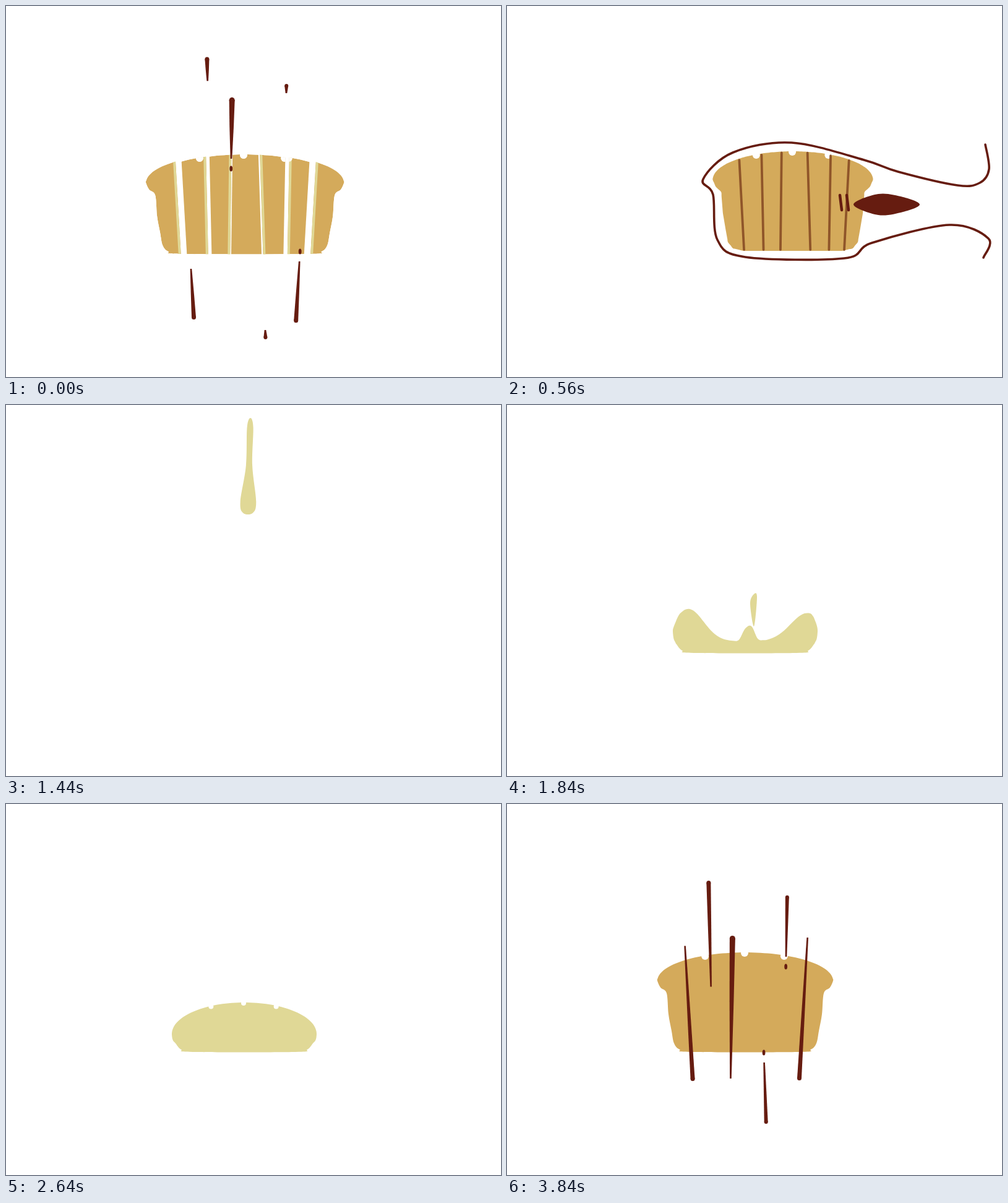
An HTML page with a canvas that plays this animation: 800 px wide and 600 px high, repeating every 3920 ms.

```html
<!DOCTYPE html>
<html lang="en">
<head>
<meta charset="utf-8">
<title>Loaf</title>
<style>
html, body { margin: 0; width: 100%; height: 100%; overflow: hidden; background: #fff; }
canvas { display: block; width: 800px; height: 600px; }
</style>
</head>
<body>
<canvas id="c" width="800" height="600"></canvas>
<script>
const ctx = document.getElementById('c').getContext('2d');
const STEP = 80, LOOP = 3920;
const DARK = '#661c10', CRUST = '#d4aa5b', CREAM = '#e0d896', LINE = '#8f5529', PAPER = '#fff';
const CX = 385, BASE = 401;

const mix = (a, b, k) => a + (b - a) * k;
const clamp = v => Math.max(0, Math.min(1, v));
const smooth = v => { v = clamp(v); return v * v * (3 - 2 * v); };
const bell = (v, w) => Math.exp(-((v / w) ** 2) / 2);
const morph = (a, b, k) => a.map((p, i) => [mix(p[0], b[i][0], k), mix(p[1], b[i][1], k)]);
const move = (pts, dx) => pts.map(([x, y]) => [x + dx, y]);

// Catmull-Rom curve through the points.
function curve(p, closed) {
  const n = p.length;
  const q = i => closed ? p[(i + n) % n] : p[Math.max(0, Math.min(n - 1, i))];
  ctx.beginPath();
  ctx.moveTo(...p[0]);
  for (let i = 0; i < (closed ? n : n - 1); i++) {
    const [a, b, c, d] = [q(i - 1), q(i), q(i + 1), q(i + 2)];
    ctx.bezierCurveTo(b[0] + (c[0] - a[0]) / 6, b[1] + (c[1] - a[1]) / 6,
      c[0] - (d[0] - b[0]) / 6, c[1] - (d[1] - b[1]) / 6, c[0], c[1]);
  }
}
function blob(pts, color) {
  curve(pts, true);
  ctx.fillStyle = color;
  ctx.fill();
}
function line(pts, color, width) {
  curve(pts, false);
  ctx.strokeStyle = color;
  ctx.lineWidth = width;
  ctx.stroke();
}
function oval(x, y, rx, ry, color) {
  ctx.beginPath();
  ctx.ellipse(x, y, rx, ry, 0, 0, 7);
  ctx.fillStyle = color;
  ctx.fill();
}

// time, top, cap half width, cap y, neck half width, neck y, foot half width, bite radius
const growth = [
  [1840, 345, 117, 365, 116, 376, 111, 0],
  [2240, 345, 117, 382, 116, 386, 111, 0],
  [2400, 345, 117, 382, 116, 386, 111, 0],
  [2640, 321, 117, 372, 116, 380, 111, 4],
  [2960, 244, 130, 297, 126, 318, 112, 6],
  [3120, 227, 136, 281, 128, 302, 113, 7],
  [3440, 240, 142, 286, 127, 306, 115, 6],
  [3920, 240, 142, 286, 127, 306, 115, 6]
];
function stage(t) {
  let i = 0;
  while (i < growth.length - 2 && t >= growth[i + 1][0]) i++;
  const a = growth[i], b = growth[i + 1], k = (t - a[0]) / (b[0] - a[0]);
  const [top, cap, capY, neck, neckY, foot, bite] = a.slice(1).map((v, j) => mix(v, b[j + 1], k));
  return { top, cap, capY, neck, neckY, foot, bite, splash: clamp((2240 - t) / 400) ** 1.5 };
}

// Elliptic top, or a splash crown, over a tin-shaped body.
function outline(s) {
  const top = [], n = 36;
  for (let i = 0; i <= n; i++) {
    const u = Math.sin((i / n - .5) * Math.PI), round = Math.sqrt(1 - u * u);
    const dome = s.capY - (s.capY - s.top) * round;
    const rim = (49 - 4 * u) * bell(Math.abs(u) - .82 - .05 * u, .22) + 29 * bell(u - .05, .06);
    const crown = 382 - mix(17, rim, Math.min(1, round * 2.6));
    top.push([CX + u * s.cap, mix(dome, crown, s.splash)]);
  }
  const footY = BASE - 14;
  const side = [
    [mix(s.cap, s.neck, .35), mix(s.capY, s.neckY, .55)],
    [s.neck, s.neckY],
    [mix(s.neck, s.foot, .25), mix(s.neckY, footY, .42)],
    [mix(s.neck, s.foot, .65), mix(s.neckY, footY, .74)],
    [s.foot, footY], [s.foot - 9, BASE - 4], [s.foot - 28, BASE]
  ];
  return [...top, ...side.map(([x, y]) => [CX + x, y]), ...side.map(([x, y]) => [CX - x, y]).reverse()];
}
const bites = s => [-.45, 0, .45].map(u =>
  [CX - 1 + u * s.cap, s.capY - (s.capY - s.top) * Math.sqrt(1 - u * u) + 1]);

function drawLoaf(s, color) {
  blob(outline(s), color);
  for (const [x, y] of bites(s)) oval(x, y, s.bite, s.bite, PAPER);
}

function drawPour(t) {
  const p = (t - 1280) / 480, x = 391;
  const top = 9 + 107 * p * p, end = 60 + 344 * p, w = 10 + 25 * p * p, h = end - top;
  const half = [[.1, 5], [.5, w * .4], [.88, w], [1, w * .6]];
  const side = d => half.map(([k, r]) => [x + 4 * (1 - k) + d * r, top + h * k]);
  blob([[x + 4, top], ...side(1), ...side(-1).reverse()], CREAM);
}

function drawDough(t) {
  const k = clamp((t - 2720) / 400);
  drawLoaf(stage(t), `rgb(${mix(224, 212, k)},${mix(216, 170, k)},${mix(150, 91, k)})`);
  if (t < 1920) blob([[400, 305], [404, 312], [399, 358], [393, 320]], CREAM);
}

// Cuts: x at the top and bottom of the loaf, stroke direction, end y, width, start time.
const cuts = [
  [288.5, 297.5, 1, 525, 7, 3670],
  [328.5, 332, -1, 75, 7, 3640],
  [364, 362, -1, 125, 9, 3680],
  [410, 415, 1, 540, 6, 3600],
  [451, 448, -1, 125, 6, 3600],
  [484, 475, 1, 535, 7, 3680]
];
const cutX = (i, y) => mix(cuts[i][0], cuts[i][1], (y - 245) / 155);

// The head of each streak slows to its end and the tail catches up.
function drawStreaks(t) {
  cuts.forEach(([, , dir, end, w, start], i) => {
    const n = (t - start) / STEP;
    if (n < 0 || n > 4.4) return;
    const head = end - dir * 400 * (1 - n / 4.4) ** 2.5;
    const tail = end - dir * (16 + 409 * (1 - smooth((n - 1) / 3)));
    const r = w / 2, h = head - dir * r;
    const half = [[tail, 1.3], [mix(tail, h, .55), r * .75], [h, r]];
    ctx.beginPath();
    for (const [y, d] of half) ctx.lineTo(cutX(i, y) + d, y);
    for (const [y, d] of half.reverse()) ctx.lineTo(cutX(i, y) - d, y);
    ctx.fillStyle = DARK;
    ctx.fill();
    oval(cutX(i, h), h, r, r, DARK);
    if (n === 3) oval(cutX(i, tail - 16 * dir), tail - 16 * dir, 2.4, 4.5, DARK);
  });
}

function drawSlices(spread) {
  const loaf = stage(3440), face = i => i < 3 ? 2 : -2;
  for (let i = 0; i <= cuts.length; i++) {
    const d = i - 2.9;
    const left = y => i ? cutX(i - 1, y) - face(i - 1) * (i > 3 ? -1 : -1) : 0;
    const right = y => i < cuts.length ? cutX(i, y) + face(i) : 800;
    ctx.save();
    ctx.translate(mix(-4.4 * d, 2 * d * Math.abs(d), spread), -5 * (1 - spread));
    ctx.beginPath();
    ctx.moveTo(i > 3 ? cutX(i - 1, 200) - 2 : i ? cutX(i - 1, 200) + 2 : 0, 200);
    ctx.lineTo(right(200), 200);
    ctx.lineTo(right(420), 420);
    ctx.lineTo(i > 3 ? cutX(i - 1, 420) - 2 : i ? cutX(i - 1, 420) + 2 : 0, 420);
    ctx.clip();
    curve(outline(loaf), true);
    ctx.clip();
    drawLoaf(loaf, CRUST);
    const shown = i < 3 ? i : i - 1;
    if (i !== 3) line([[cutX(shown, 200), 200], [cutX(shown, 420), 420]], CREAM, 4);
    for (const [x, y] of bites(loaf)) oval(x, y, loaf.bite, loaf.bite, PAPER);
    ctx.restore();
  }
}

function divide(p, closed) {
  const out = [];
  for (let i = 0; i < p.length - (closed ? 0 : 1); i++) {
    const a = p[i], b = p[(i + 1) % p.length], n = Math.ceil(Math.hypot(b[0] - a[0], b[1] - a[1]) / 7);
    for (let j = 0; j < n; j++) out.push([mix(a[0], b[0], j / n), mix(a[1], b[1], j / n)]);
  }
  return closed ? out : [...out, p[p.length - 1]];
}
// Packs the slices, then lets the tied neck of the bag dent the end.
function pack([x, y], m) {
  x += 77 - (x - CX) * .088;
  y -= 5;
  const edge = clamp((x - 551) / 8);
  const bow = 24 * smooth((x - 485) / 30) * clamp(1 - ((y - 322) / 76) ** 2);
  const pinch = 30 * bell(y - 324, 20);
  const push = 46 * edge * smooth((y - 345) / 35);
  return [x + m * (push - mix(bow, pinch, edge)), y];
}
function drawPacked(off, m) {
  const loaf = stage(3440), place = p => move(p.map(q => pack(q, m)), off);
  blob(place(divide(outline(loaf), true)), CRUST);
  for (const [x, y] of place(bites(loaf))) oval(x, y, 6, 6, PAPER);
  cuts.forEach((_, i) => {
    const u = (cutX(i, 250) - CX) / loaf.cap;
    const top = loaf.capY - (loaf.capY - loaf.top) * Math.sqrt(1 - u * u) + 2;
    line(place(divide([[cutX(i, top) + 1, top], [cutX(i, 399) + 1, 399]])), LINE, 3.8);
  });
}

// Bag and its print, open and tied; the tied set is drawn 226 further left.
const bagOpen = [[773,224],[779,264],[764,286],[728,290],[632,268],[577,249],[460,221],[365,237],[317,280],
  [333,305],[340,378],[385,406],[545,408],[590,383],[715,354],[778,376],[770,407]];
const bagTied = move([[487,332],[485,314],[478,315],[399,331],[350,316],[375,282],[300,236],[140,236],[98,280],
  [111,305],[127,380],[155,405],[372,406],[398,390],[344,342],[440,333],[487,332]], 226);
const printOpen = [[560,321],[600,304],[640,309],[667,321],[640,333],[600,338]];
const printTied = move([[232,326],[268,300],[313,308],[298,321],[303,335],[268,345]], 226);

function drawBag(off, m) {
  line(move(morph(bagOpen, bagTied, m), off), DARK, 3.6);
  const print = move(morph(printOpen, printTied, m), off);
  blob(print, DARK);
  const [x, y] = print[0];
  for (const gap of [8, 19]) line([[x - gap - 3, y - 15], [x - gap, y + 9]], DARK, mix(4.5, 6, m));
  oval(592 + off, 331, 33 * m, 13 * m, DARK);
}

function drawBagged(t) {
  const enter = clamp((t - 160) / 400), leave = clamp((t - 560) / 400);
  const off = -620 * (1 - enter) ** 1.7 - 430 * leave ** 2.9, tie = smooth(leave / .6);
  drawPacked(leave ? off : Math.max(-77, off), tie);
  drawBag(off, tie);
}

function draw(t) {
  ctx.fillStyle = PAPER;
  ctx.fillRect(0, 0, 800, 600);
  ctx.lineCap = ctx.lineJoin = 'round';
  if (t < 160) drawSlices(t ? .4 : 1);
  else if (t < 1040) drawBagged(t);
  else if (t >= 1280 && t < 1840) drawPour(t);
  else if (t >= 1840) drawDough(t);
  drawStreaks(t < 1040 ? t + LOOP : t);
}

let shown = -1;
function tick() {
  const t = Math.floor(performance.now() % LOOP / STEP) * STEP;
  if (t !== shown) draw(shown = t);
  requestAnimationFrame(tick);
}
tick();
</script>
</body>
</html>
```
